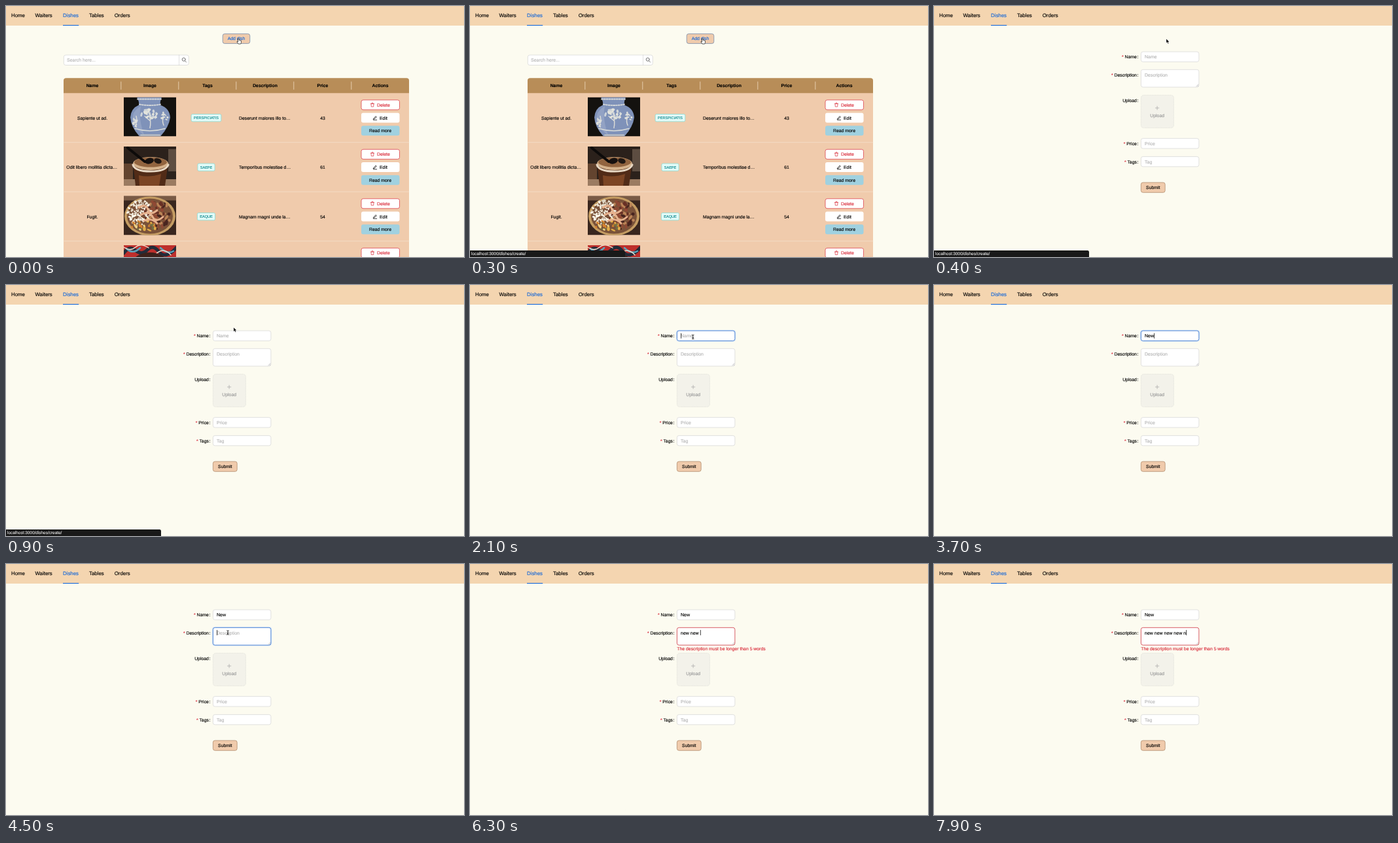
Write an HTML page that moves like this. It is 700 px wide and 384 px high and loops after 8000 ms.

```html
<!DOCTYPE html>
<html lang="en">
<head>
<meta charset="utf-8">
<title>Dishes</title>
<style>
html, body { margin: 0; width: 100%; height: 100%; overflow: hidden; background: #fcfbf0; }
svg { display: block; width: 100%; height: 100%; }
text { font-family: "Liberation Sans", Arial, sans-serif; text-rendering: geometricPrecision; white-space: pre; }
</style>
</head>
<body>
<svg id="stage" viewBox="0 0 700 384"></svg>
<script>
const LOOP = 8000, STEP = 100;
const PAGE_OPENS = 400, NAME_CLICK = 1200, DESCRIPTION_CLICK = 4400;
const BLUE = '#1668d8', RED = '#d92d3c', PEACH = '#f0cbac', BORDER = '#d5d5d5', HINT = '#b4b4b4';
const stage = document.getElementById('stage');
const ruler = document.createElement('canvas').getContext('2d');
ruler.font = '100px "Liberation Sans", Arial, sans-serif';

const textWidth = (s, size) => ruler.measureText(s).width * size / 100;
const ramp = (t, from, to) => Math.min(1, Math.max(0, (t - from) / (to - from)));
const smooth = p => p * p * (3 - 2 * p);
const mix = (a, b, p) => a + (b - a) * p;
const between = (t, from, to) => t >= from && t < to;
const latest = (list, t) => list.reduce((found, [at, value]) => t >= at ? value : found, '');

const text = (x, y, s, { size = 6.87, fill = '#000', anchor = 'start', extra = '' } = {}) =>
  `<text x="${x}" y="${y}" font-size="${size}" fill="${fill}" stroke="${fill}" stroke-width=".14" text-anchor="${anchor}" ${extra}>${s}</text>`;
const centered = (x, y, s, options) => text(x, y, s, { anchor: 'middle', ...options });
const box = (x, y, w, h, fill, stroke = 'none', r = 3, extra = '') =>
  `<rect x="${x}" y="${y}" width="${w}" height="${h}" rx="${r}" fill="${fill}" stroke="${stroke}" stroke-width=".7" ${extra}/>`;
const path = (d, stroke, width = .7, fill = 'none', extra = '') =>
  `<path d="${d}" fill="${fill}" stroke="${stroke}" stroke-width="${width}" stroke-linecap="round" ${extra}/>`;
const oval = (x, y, rx, ry, fill, turn = 0) =>
  `<ellipse cx="${x}" cy="${y}" rx="${rx}" ry="${ry}" fill="${fill}" transform="rotate(${turn} ${x} ${y})"/>`;
const group = (x, y, content, extra = '') => `<g transform="translate(${x} ${y})" ${extra}>${content}</g>`;

function randomizer(seed) {
  return () => (seed = seed * 16807 % 2147483647) / 2147483647;
}

function scatter(count, seed, area, colors, size) {
  const random = randomizer(seed);
  const [x, y, rx, ry] = area;
  return Array.from({ length: count }, () => {
    const angle = random() * 6.28, reach = Math.sqrt(random());
    return oval((x + rx * reach * Math.cos(angle)).toFixed(1), (y + ry * reach * Math.sin(angle)).toFixed(1),
      (size * (.6 + random())).toFixed(1), (size * (.4 + random() * .5)).toFixed(1),
      colors[Math.floor(random() * colors.length)], Math.round(random() * 180));
  }).join('');
}

// Pictures, each 80 by 60
const vase = box(0, 0, 80, 60, '#14120f', 'none', 0)
  + path('M20 0H58Q55 7 56 12Q70 17 71 31Q69 46 56 60H24Q11 46 10 31Q11 17 23 12Q24 7 20 0Z', 'none', 0, '#7f92b9')
  + path('M15 24Q22 15 26 14Q22 32 31 58Q16 48 13 34Z', 'none', 0, '#a5b4d0', 'opacity=".5"')
  + path('M21 3H57M24 11Q40 14 56 11', '#d6d9da', 1.8, 'none', 'stroke-dasharray="2 1.8"')
  + path('M40 47Q42 38 39 28M40 36L32 29M41 34L50 28M18 43Q21 36 19 29M61 43Q58 36 61 30', '#d9dad6', 1.5)
  + scatter(26, 77, [40, 26, 13, 8], ['#e2e3dc', '#cfd5d9'], 2.2)
  + scatter(9, 31, [18, 38, 5, 9], ['#dddfdb'], 2) + scatter(9, 15, [62, 31, 5, 8], ['#dddfdb'], 1.8)
  + path('M17 48Q40 55 63 48', '#d9dcd9', 1.6) + path('M26 58H55', '#c4c8c8', 2);

const drink = box(0, 0, 80, 60, '#2b211b', 'none', 0)
  + box(0, 26, 14, 34, '#63442f', 'none', 0) + box(68, 4, 12, 34, '#5d4d41', 'none', 0)
  + box(0, 50, 80, 10, '#9b7b61', 'none', 0)
  + path('M14 25Q40 16 68 25L63 60H18Z', 'none', 0, '#512b17')
  + path('M23 44Q39 48 57 42L54 60H24Z', 'none', 0, '#7c4524')
  + oval(41, 26, 27, 10, '#d5b28c') + oval(41, 24, 25, 7.5, '#92643f')
  + path('M14 28Q17 38 41 38Q64 38 68 28', '#e8d8c4', 3)
  + oval(39, 22, 7, 4.5, '#17110f', -15) + oval(52, 22, 6, 4, '#211813', 20)
  + path('M6 2L32 23', '#0d0b0a', 4);

const meal = box(0, 0, 80, 60, '#39261e', 'none', 0) + box(0, 0, 80, 7, '#795a45', 'none', 0)
  + oval(40, 31, 39, 30, '#c49c62') + oval(40, 31, 35, 27, '#7a5239')
  + scatter(70, 8, [51, 28, 21, 22], ['#683025', '#8f4934', '#48251f', '#bb8356'], 3)
  + scatter(120, 19, [24, 25, 18, 19], ['#f0eadc', '#ddd4c2', '#fff9eb'], 1.8)
  + scatter(24, 42, [31, 45, 20, 9], ['#e0ac48', '#d5822e', '#727044', '#edcf83'], 2.6)
  + path('M23 18Q34 11 37 21T51 22M26 29Q39 22 44 32T60 32M31 38Q43 33 51 42', '#e7b18d', 3);

const pattern = box(0, 0, 80, 60, '#bd2f2c', 'none', 0)
  + path('M0 12Q8 0 18 8T36 7T54 10T80 4', '#222c3a', 5) + path('M4 5Q14 15 25 4M56 4Q66 14 76 9', '#5da2b9', 2.5)
  + path('M0 3Q10 10 18 3T38 4M48 14Q61 2 72 15', '#ebdfce', 1.4) + oval(40, 30, 28, 19, '#3c211b');

const pencil = path('M-2.3 1.6L1 -2.2L2.3 -1L-1 2L-2.6 2.4ZM-2.5 3.5H2.7', '#111', .8);
const bin = path('M-2.7 -1.6H2.7M-1 -1.8V-2.9H1V-1.8M-2 -1.4L-1.7 2.8H1.7L2 -1.4', RED, .7);

function actionButtons(y) {
  return box(543, y - 27.2, 58.5, 15, '#fff', RED) + group(560, y - 19.8, bin) + text(567, y - 17.3, 'Delete', { fill: RED })
    + box(543, y - 7.4, 58.5, 15, '#fff') + group(564, y - .2, pencil) + text(571, y + 2.5, 'Edit')
    + box(543, y + 12.3, 58.5, 15, '#a0d1e0') + centered(572, y + 22.4, 'Read more');
}

const dishes = [
  ['Sapiente ut ad.', vase, 'PERSPICIATIS', 'Deserunt maiores illo to…', 43],
  ['Odit libero mollitia dicta…', drink, 'SAEPE', 'Temporibus molestiae d…', 61],
  ['Fugit.', meal, 'EAQUE', 'Magnam magni unde la…', 54],
  ['Quia.', pattern, 'ODIO', 'Voluptatem rerum quia…', 38]
];

function dishRow([name, picture, tag, description, price], index) {
  const y = 171 + index * 75.5;
  const tagWidth = textWidth(tag, 5.6) + 7.5;
  return centered(name.length > 20 ? 131.2 : 132, y + 2.5, name)
    + group(180, y - 31.5, `<svg width="80" height="60">${picture}</svg>`)
    + box(306 - tagWidth / 2, y - 5.5, tagWidth, 11.3, '#e2fbf8', '#7fdcd5', 2)
    + centered(306, y + 2.3, tag, { size: 5.6, fill: '#168b91' })
    + text(356, y + 2.5, description) + centered(484, y + 2.5, price) + actionButtons(y)
    + path(`M88 ${y + 37.7}H616`, '#f7e2ce');
}

const nav = box(0, 0, 700, 30, '#f4d5b0', 'none', 0)
  + [[8, 'Home'], [44.5, 'Waiters'], [87, 'Dishes'], [127, 'Tables'], [165.7, 'Orders']].map(([x, s]) =>
    text(x, 17.3, s, { size: 7.85, fill: s === 'Dishes' ? BLUE : '#000' })).join('')
  + box(87, 29, 24.2, 1.1, BLUE, 'none', 0);

const listPage = box(331.2, 42.6, 41.6, 14.8, PEACH, '#6681a8') + centered(352, 52.4, 'Add dish', { fill: BLUE })
  + box(88.3, 75, 191, 15.5, '#fff', BORDER) + path('M264.5 75V90.5', BORDER)
  + text(93, 85.2, 'Search here...', { size: 7, fill: HINT })
  + path('M273.6 84L275.5 86M274.2 81.8A2.5 2.5 0 1 1 269.2 81.8A2.5 2.5 0 1 1 274.2 81.8', '#555', .8)
  + box(88, 130, 528, 260, PEACH, 'none', 0)
  + path('M88 133.3V114Q88 110.3 92 110.3H612Q616 110.3 616 114V133.3Z', 'none', 0, '#b88d58')
  + ['Name', 'Image', 'Tags', 'Description', 'Price', 'Actions'].map((s, i) =>
    centered(132 + i * 88, 124.3, s, { extra: 'font-weight="bold"' })
    + (i ? path(`M${87.8 + i * 88} 116V127.5`, '#f1dcc0', .8) : '')).join('')
  + dishes.map(dishRow).join('');

const label = (y, s, required = true) => text(312.4, y,
  `${required ? `<tspan fill="${RED}" stroke="${RED}">* </tspan>` : ''}${s}<tspan dx=".6">:</tspan>`, { anchor: 'end' });

function field(y, h, { hint, value = '', state = '', caret = false }) {
  const stroke = { focus: '#3a78d0', hover: '#5b93e6', error: '#d34a55', settle: '#3d62b5' }[state] || BORDER;
  const glow = { focus: '#d6e5f8', settle: '#d9e2f2' }[state];
  const caretX = 322.3 + textWidth(value, 7);
  return (glow ? box(315.7, y - .7, 89.9, h + 1.4, 'none', glow, 3.5, 'style="stroke-width:1.2"') : '')
    + box(316.4, y, 88.5, h, '#fff', stroke, 3, state ? 'style="stroke-width:.9"' : '')
    + text(322, y + 10.3, value || hint, { size: 7, fill: value ? '#000' : HINT })
    + (caret ? box(caretX, y + 3.6, .8, 8.2, '#111', 'none', 0) : '');
}

const nameTyping = [[2200, 'N'], [2400, 'Ne'], [2800, 'New']];
const descriptionTyping = [
  [4900, 'n'], [5200, 'ne'], [5500, 'new'], [5700, 'new '], [5900, 'new n'], [6000, 'new ne'],
  [6300, 'new new '], [6600, 'new new n'], [6700, 'new new ne'], [6900, 'new new new'], [7000, 'new new new '],
  [7300, 'new new new n'], [7400, 'new new new ne'], [7600, 'new new new new'], [7700, 'new new new new '],
  [7900, 'new new new new n']
];
const nameState = [[1000, 'hover'], [NAME_CLICK, 'focus'], [2300, 'error'], [2800, 'settle'], [2900, 'focus'], [DESCRIPTION_CLICK, '']];
const descriptionState = [[4200, 'hover'], [DESCRIPTION_CLICK, 'focus'], [5000, 'error']];

function formPage(t) {
  const nameError = smooth(ramp(t, 2100, 2500)) * (1 - ramp(t, 2800, 3000));
  const descriptionError = ramp(t, 4900, 5200);
  const caretHidden = between(t, 1700, 2100) || between(t, 3300, 3700) || between(t, 4200, DESCRIPTION_CLICK);
  const nameCaret = between(t, NAME_CLICK, DESCRIPTION_CLICK) && !caretHidden;
  const below = label(108, 'Description')
    + field(97.3, 26.8, {
      hint: 'Description', value: latest(descriptionTyping, t),
      state: latest(descriptionState, t), caret: t >= DESCRIPTION_CLICK
    })
    + path('M401 123L404 120M403 123L404 122', '#888', .5)
    + label(146.6, 'Upload', false) + box(316.4, 136.4, 50, 50, '#f3f2ea', '#dcdbd4', 4, 'stroke-dasharray="1.5 1"')
    + path('M338.4 156H343.8M341.1 153.3V158.7', '#999', .6) + centered(341.2, 169.5, 'Upload', { fill: '#999' })
    + label(213, 'Price') + field(202.6, 15.4, { hint: 'Price' })
    + label(240.6, 'Tags') + field(230.4, 15.4, { hint: 'Tag' })
    + box(316.4, 270, 36.8, 15.3, PEACH, '#aa8262') + centered(334.8, 280.2, 'Submit');
  return label(80.2, 'Name')
    + field(70, 15.4, { hint: 'Name', value: latest(nameTyping, t), state: latest(nameState, t), caret: nameCaret })
    + group(0, 9.3 * nameError, below)
    + group(0, 0, text(316.3, 93.8, 'The name of the dish must be longer than 3', { fill: RED })
      + text(316.3, 104.3, 'symbols', { fill: RED }), `opacity="${nameError}"`)
    + text(316.3, 132.3, 'The description must be longer than 5 words', { fill: RED, extra: `opacity="${descriptionError}"` });
}

const arrow = path('M0 0V6.3L1.5 5L2.6 7.4L3.7 6.9L2.7 4.6H4.6Z', '#fff', .4, '#000');
const beam = path('M-1.3 -3.3Q0 -3.3 0 -2.3Q0 -3.3 1.3 -3.3M0 -2.5V2.5M-1.3 3.3Q0 3.3 0 2.3Q0 3.3 1.3 3.3M-.8 .9H.8', '#111', .8);
const hand = path('M-.8 3.6V-.2Q0 -1.2 .7 -.2V2.3Q1.4 1.7 2 2.6Q2.7 2.1 3.2 3Q4.2 2.7 4.2 3.8V5.4Q4.2 6.8 3.4 8H-.2Q-1.4 6.2 -2.4 4.9Q-2.6 3.5 -.8 4.6Z', '#111', .7, '#fff');

function pointer(t) {
  if (t < PAGE_OPENS) return group(355.3, 50, hand);
  if (between(t, 2200, 3900) || t >= 4900) return '';
  const first = smooth(ramp(t, 600, NAME_CLICK)), second = smooth(ramp(t, 3800, DESCRIPTION_CLICK));
  const x = mix(mix(355, 340.8, first), 339, second);
  const y = mix(mix(50.3, 79.5, first), 105, second);
  const overField = between(y, 70, 86) || y > 97;
  return group(x, y, overField ? beam : arrow);
}

// The link preview lingers for a moment after the pointer moves on
function statusBar(t) {
  const opacity = ramp(t, 0, 200) * (1 - ramp(t, 900, 1100));
  return group(0, 0, path('M0 374H234.5Q237 374 237 376.5V384H0Z', 'none', 0, '#191919')
    + text(2, 381.3, 'localhost:3000/dishes/create/', { size: 6.45, fill: '#dedede' }), `opacity="${opacity}"`);
}

let shown = -1;
function tick(now) {
  const t = Math.floor(now % LOOP / STEP) * STEP;
  if (t !== shown) {
    shown = t;
    stage.innerHTML = nav + (t < PAGE_OPENS ? listPage : formPage(t)) + statusBar(t) + pointer(t);
  }
  requestAnimationFrame(() => tick(performance.now()));
}
tick(performance.now());
</script>
</body>
</html>
```
